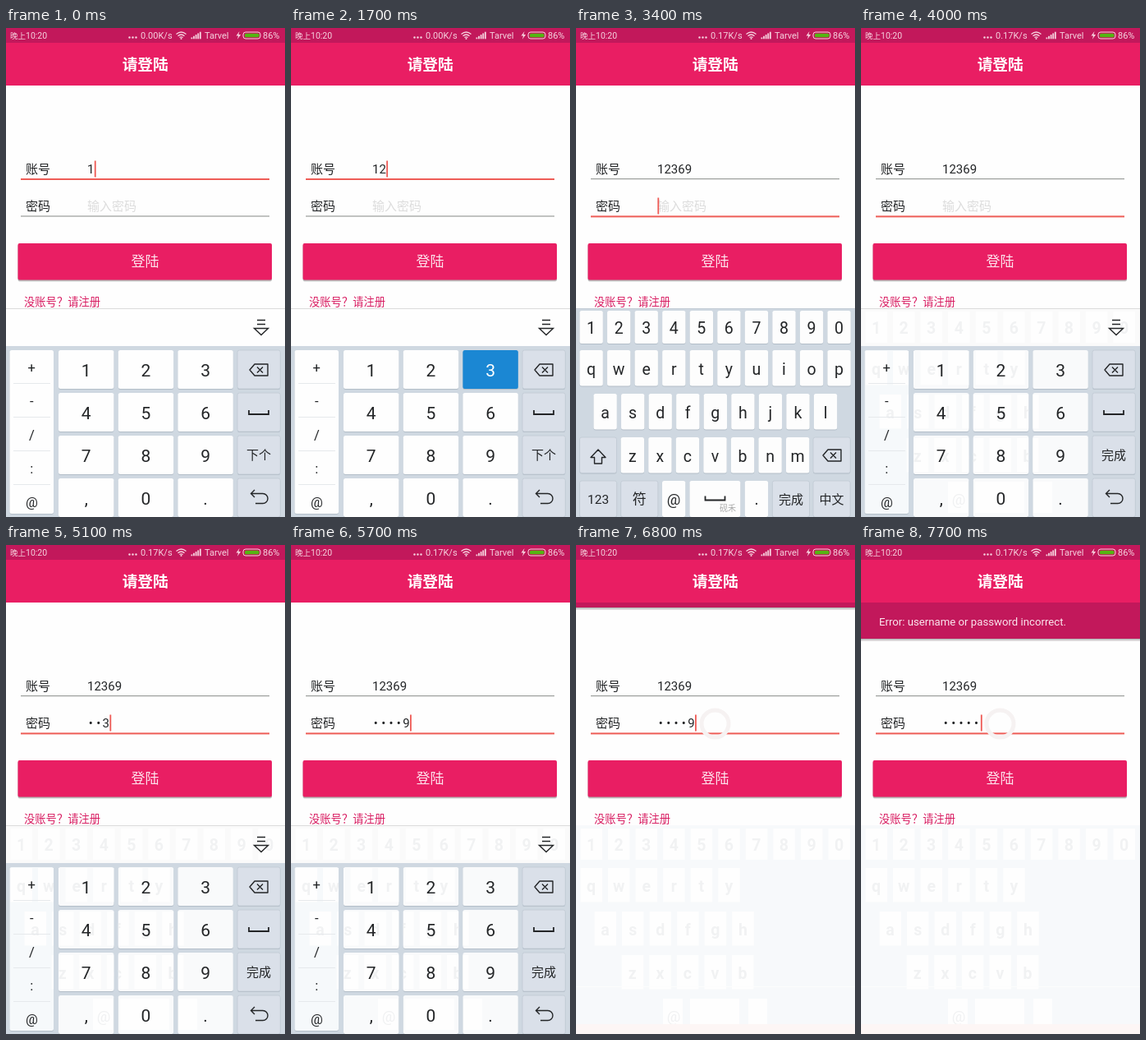
Write an HTML page that moves like this. It is 340 px wide and 595 px high and loops after 8000 ms.

```html
<!DOCTYPE html>
<html lang="zh-CN">
<head>
<meta charset="utf-8">
<title>请登陆</title>
<style>
html, body { margin: 0; width: 100%; height: 100%; overflow: hidden; background: #fefefe; }
svg { display: block; width: 340px; height: 595px; font-family: Roboto, "Noto Sans CJK SC", "Noto Sans CJK", sans-serif; }
text { white-space: pre; }
</style>
</head>
<body>
<svg id="stage" viewBox="0 0 340 595"></svg>
<script>
const LOOP = 8000, STEP = 100;
const PINK = '#e91e63', DARK = '#c2185b', INK = '#232527', PANEL = '#cfd8e1', MUTED = '#dae0e9';

// Markup helpers
const rect = (x, y, w, h, fill, more = '') =>
  `<rect x="${x}" y="${y}" width="${w}" height="${h}" fill="${fill}" ${more}/>`;
const text = (x, y, str, size, fill = INK, more = '') =>
  `<text x="${x}" y="${y}" font-size="${size}" fill="${fill}" ${more}>${str}</text>`;
const mid = (x, y, str, size, fill = INK, more = '') =>
  text(x, y, str, size, fill, 'text-anchor="middle" ' + more);
const line = (d, color = INK, width = 1.4, more = '') =>
  `<path d="${d}" fill="none" stroke="${color}" stroke-width="${width}" ${more}/>`;
const group = (id, body, more = '') => `<g id="${id}" ${more}>${body}</g>`;

const face = (x, y, w, h, fill, more = '') =>
  rect(x, y + 1, w, h, '#b3bec8', 'rx="2.5"') + rect(x, y, w, h, fill, 'rx="2.5" ' + more);
const mutedFace = (x, y, w, h) => face(x, y, w, h, MUTED, 'stroke="#c1cad4" stroke-width=".8"');

const backspace = (x, y) => line(
  `M${x - 11} ${y}l6-7h16v14h-16zM${x - 2} ${y - 3.5}l7 7m0-7l-7 7`, INK, 1.4, 'stroke-linejoin="round"');
const spaceIcon = (x, y) => line(`M${x - 12} ${y - 4}v5h24v-5`, INK, 1.8);

// Status bar
function statusBar() {
  const white = '#f6d3df';
  const dots = [150.5, 154.5, 158.5].map(x => `<circle cx="${x}" cy="11.5" r="1.2" fill="${white}"/>`).join('');
  const wifi = line('M207.5 7.5q6-5 12 0M209.5 9.7q4-3.4 8 0M211.4 11.6q2.1-1.6 4.2 0', white, 1.3) +
    `<circle cx="213.5" cy="13" r="1" fill="${white}"/>`;
  const bars = [0, 1, 2, 3, 4].map(i => rect(225.5 + i * 2.6, 11.5 - i * 1.7, 1.8, 1.8 + i * 1.7, white)).join('');
  return rect(0, 0, 340, 18, DARK) +
    text(5, 12.7, '晚上<tspan font-size="10.5">10:20</tspan>', 9.5, white) + dots +
    text(164, 13, '0.00K/s', 11, white, 'id="rate"') + wifi + bars +
    text(242, 13, 'Tarvel', 11, white) +
    `<path d="M284.5 4l-4 5.5h2.6l-1.2 4.2 4.2-5.8h-2.7z" fill="${white}"/>` +
    rect(289, 5, 21, 8, 'none', `rx="3" stroke="${white}"`) + rect(291, 6.7, 17.5, 4.6, '#55b512', 'rx="1.6"') +
    text(313, 13, '86%', 11, white);
}

// Login form
function form() {
  return text(24, 177.4, '账号', 15) + text(99, 177.4, '', 15, INK, 'id="account"') +
    rect(18, 183, 303, 2, '', 'id="line0"') +
    text(24, 222.4, '密码', 15) + text(99, 222.2, '输入密码', 15, '#dcdcdc', 'id="hint"') +
    text(103, 222.4, '', 15, INK, 'id="dots" text-anchor="middle"') +
    text(99, 222.4, '', 15, INK, 'id="last"') +
    rect(18, 228.4, 303, 2, '', 'id="line1"') +
    rect(0, 0, 1.8, 20, '#ee5a55', 'id="caret"') +
    rect(14.5, 263.5, 309.5, 45, '#000', 'rx="2" opacity=".18"') +
    rect(14.5, 262.5, 309.5, 45, '#000', 'rx="2" opacity=".18"') +
    rect(14.5, 262, 309.5, 44.6, PINK, 'rx="2"') +
    mid(169.5, 290.4, '登陆', 17, '#fde4ed') +
    text(22, 337.6, '没账号？请注册', 13.3, '#d81b60');
}

// Letter keyboard
const PITCH = 33.55;
const rows = [
  { chars: '1234567890', x: 4.5, y: 344, h: 40, base: 372, ghost: 10 },
  { chars: 'qwertyuiop', x: 4.5, y: 392, h: 43.5, base: 421.5, ghost: 6 },
  { chars: 'asdfghjkl', x: 21.5, y: 445, h: 43.5, base: 475, ghost: 6 },
  { chars: 'zxcvbnm', x: 54.7, y: 498, h: 43.5, base: 528, ghost: 5 },
];

function letterKeys() {
  let out = rect(0, 341, 340, 254, PANEL) + rect(0, 341, 340, 1, '#c3ccd5');
  for (const r of rows)
    [...r.chars].forEach((c, i) => {
      const x = r.x + i * PITCH;
      out += face(x, r.y, 28.3, r.h, '#fdfdfd') + mid(x + 14.1, r.base, c, 19.5);
    });
  out += mutedFace(4.5, 498, 45, 43.5) + mutedFace(289, 498, 45.3, 43.5) + backspace(312, 520) +
    line('M27 513l9 9.5h-4.5v7.5h-9v-7.5h-4.5z', INK, 1.4, 'stroke-linejoin="round"');
  for (const [x, label, size] of [[4.5, '123', 15.5], [54.7, '符', 17], [239.3, '完成', 15], [289, '中文', 15]])
    out += mutedFace(x, 551, 45.2, 44) + mid(x + 22.6, 578.5, label, size);
  out += face(105, 551, 28.3, 44, '#fdfdfd') + mid(119, 580, '@', 18.5) +
    face(138.5, 551, 61.8, 44, '#fdfdfd') + spaceIcon(169.5, 573.5) + mid(185, 588, '砚禾', 10, '#a9a9a9') +
    face(205.8, 551, 28.3, 44, '#fdfdfd') + mid(220, 580, '.', 19.5);
  return out;
}

// Faint imprint left behind by the letter keyboard
function imprint() {
  let out = '';
  for (const r of rows)
    [...r.chars].slice(0, r.ghost).forEach((c, i) => {
      const x = r.x + i * PITCH;
      out += rect(x + 1, r.y + 1, 26.5, r.h - 2, '#fefefe') +
        mid(x + 14.1, r.base, c, 19.5, '#f1f2f3', 'font-weight="bold"');
    });
  return out + rect(106, 552, 24, 38, '#fefefe') + mid(119, 580, '@', 18.5, '#f0f1f2') +
    rect(139, 552, 60, 38, '#fefefe') + rect(210, 552, 23, 38, '#fefefe');
}

// Number keyboard
const pad = [...'123456789,0.'].map((c, i) => ({
  c, x: [64, 136.8, 209.4][i % 3], y: 392 + 52 * Math.floor(i / 3),
}));

function numberKeys() {
  let faces = '', labels = '', clip = rect(0, 342, 340, 45, '#fff') + rect(4.5, 392, 53.5, 199, '#fff');
  for (const k of pad) {
    faces += face(k.x, k.y, 67.4, 47, '#fff', `data-key="${k.c}"`);
    clip += rect(k.x, k.y, 67.4, 47, '#fff');
    labels += mid(k.x + 33.7, k.y + 32.3, k.c, 21, INK, `data-label="${k.c}"`);
  }
  [...'+-/:@'].forEach((c, i) => {
    const y = 413 + i * 41;
    labels += mid(31.3, y + 5.8, c, 16.5);
    if (i < 4) labels += rect(9, y + 19, 45, 1, '#e6e9ec');
  });
  for (let i = 0; i < 4; i++) faces += mutedFace(282, 392 + 52 * i, 52.3, 47);
  return `<clipPath id="faces">${clip}</clipPath>` +
    rect(0, 341, 340, 46, '#fefefe', 'id="strip"') + rect(0, 341, 340, 1, '#dcdcdc') +
    rect(0, 387, 340, 208, PANEL) + face(4.5, 392, 53.5, 199, '#fff', 'id="side"') + faces +
    group('padImprint', imprint(), 'clip-path="url(#faces)"') + labels +
    line('M306 355.5h10M306 360.5h10M302.5 365.5h17l-8.5 8z') +
    backspace(308, 416) + spaceIcon(308, 469) + mid(308, 525, '', 15, INK, 'id="action"') +
    line('M303 562l-4.5 4.5 4.5 4.5M299 566.5h14a6 6 0 0 1 0 12h-9');
}

const spinner = `<circle cx="169.5" cy="217.5" r="16.5" fill="none" stroke="#f6f2f2" stroke-width="5"/>` +
  group('arc', `<circle cx="169.5" cy="217.5" r="16.5" fill="none" stroke="${PINK}" stroke-width="4" stroke-dasharray="72 32"/>`);

const banner = `<clipPath id="reveal">${rect(0, 70, 340, 44, '#fff', 'id="window"')}</clipPath>` +
  rect(0, 70, 340, 47, '#000', 'id="shade" opacity=".13"') +
  rect(0, 70, 340, 45, '#000', 'id="shade2" opacity=".2"') +
  `<g clip-path="url(#reveal)">${rect(0, 70, 340, 44, DARK)}${
    text(22, 98, 'Error: username or password incorrect.', 13.2, '#fbe6ee')}</g>`;

document.getElementById('stage').innerHTML =
  rect(0, 0, 340, 595, '#fefefe') + form() +
  group('residue', rect(0, 341, 340, 254, '#f7f9fb') + imprint() + rect(0, 537, 340, 1, '#fdfdfd') +
    rect(0, 583, 340, 12, '#fdf6f5')) +
  group('letters', letterKeys()) + group('numbers', numberKeys()) +
  group('spinner', spinner) + group('banner', banner) +
  rect(0, 18, 340, 52, PINK) + statusBar() +
  mid(169.7, 51, '请登陆', 18.7, '#fff', 'font-weight="bold"');

// Timelines: [time, value], each held until the next
const account = [[0, '1'], [1200, '12'], [1800, '123'], [2700, '1236'], [3000, '12369']];
const secret = [[0, ''], [4500, '1'], [4800, '•2'], [5100, '••3'], [5600, '•••6'], [5700, '••••9'], [7000, '•••••']];
const presses = [[0, ''], [1700, '3'], [1800, ''], [2600, '6'], [2700, ''], [2900, '9'], [3000, ''],
  [5500, '6'], [5600, '9'], [5700, '']];
const blink = [[0, 1], [500, 0], [900, 1], [2300, 0], [2700, 1], [3900, 0], [4400, 1],
  [6200, 0], [6700, 1], [7100, 0], [7700, 1]];
const bannerHeight = [[0, 0], [6800, 6], [6900, 14], [7000, 32], [7100, 44]];

const at = (track, t) => track.reduce((v, [time, value]) => (t >= time ? value : v), track[0][1]);
const $ = id => document.getElementById(id);
const set = (id, attrs) => { for (const k in attrs) $(id).setAttribute(k, attrs[k]); };
const show = (id, on) => set(id, { display: on ? 'inline' : 'none' });

const CHAR = 8.43, DOT = 9.3;

function drawFields(t) {
  const name = at(account, t), pass = at(secret, t), second = t >= 3400;
  const dots = (pass.match(/•/g) || []).length, digit = pass.slice(dots);
  $('account').textContent = name;
  $('dots').textContent = '•'.repeat(dots);
  set('dots', { x: Array.from({ length: dots }, (_, i) => 103.4 + i * DOT).join(' ') || 0 });
  $('last').textContent = digit;
  set('last', { x: 99 + dots * DOT });
  show('hint', !pass);
  const end = second ? dots * DOT + digit.length * CHAR : name.length * CHAR;
  set('caret', { x: 99.4 + end, y: second ? 206.5 : 161.5 });
  show('caret', at(blink, t));
  const focus = second ? 1 : 0;
  [0, 1].forEach(i => set('line' + i, i === focus
    ? { fill: '#ee5d57', height: 2 }
    : { fill: '#9b9e9b', height: 1.2 }));
}

function drawKeyboards(t) {
  const worn = t >= 4000, down = at(presses, t);
  show('letters', t >= 3400 && t < 4000);
  show('numbers', (t < 3400 || worn) && t < 6400);
  show('residue', t >= 6100);
  show('padImprint', worn);
  const p = Math.min(1, Math.max(0, (t - 6000) / 400));
  set('numbers', { transform: `translate(0 ${254 * p * p})` });
  set('strip', { fill: worn ? '#fafafa' : '#fefefe' });
  set('side', { fill: worn ? '#f6f9fb' : '#fefefe' });
  $('action').textContent = worn ? '完成' : '下个';
  for (const { c } of pad) {
    const used = presses.some(([time, key]) => key === c && time < t);
    const fill = c === down ? '#1b87d3' : worn ? '#f9fafb' : used ? '#f7f7f7' : '#fefefe';
    document.querySelector(`[data-key="${c}"]`).setAttribute('fill', fill);
    document.querySelector(`[data-label="${c}"]`).setAttribute('fill', c === down ? '#fff' : INK);
  }
}

function drawFeedback(t) {
  show('spinner', t >= 6200);
  show('arc', t < 6700);
  set('arc', { transform: `rotate(${(t - 6200) * 0.45} 169.5 217.5)` });
  const h = at(bannerHeight, t);
  show('banner', h > 0);
  set('window', { height: h });
  set('shade', { height: h + 3 });
  set('shade2', { height: h + 1.2 });
  $('rate').textContent = t < 2800 ? '0.00K/s' : '0.17K/s';
}

const start = performance.now();
function frame() {
  const now = (performance.now() - start) % LOOP;
  const t = Math.floor(now / STEP) * STEP;
  drawFields(t);
  drawKeyboards(t);
  drawFeedback(t);
  requestAnimationFrame(frame);
}
frame();
</script>
</body>
</html>
```
